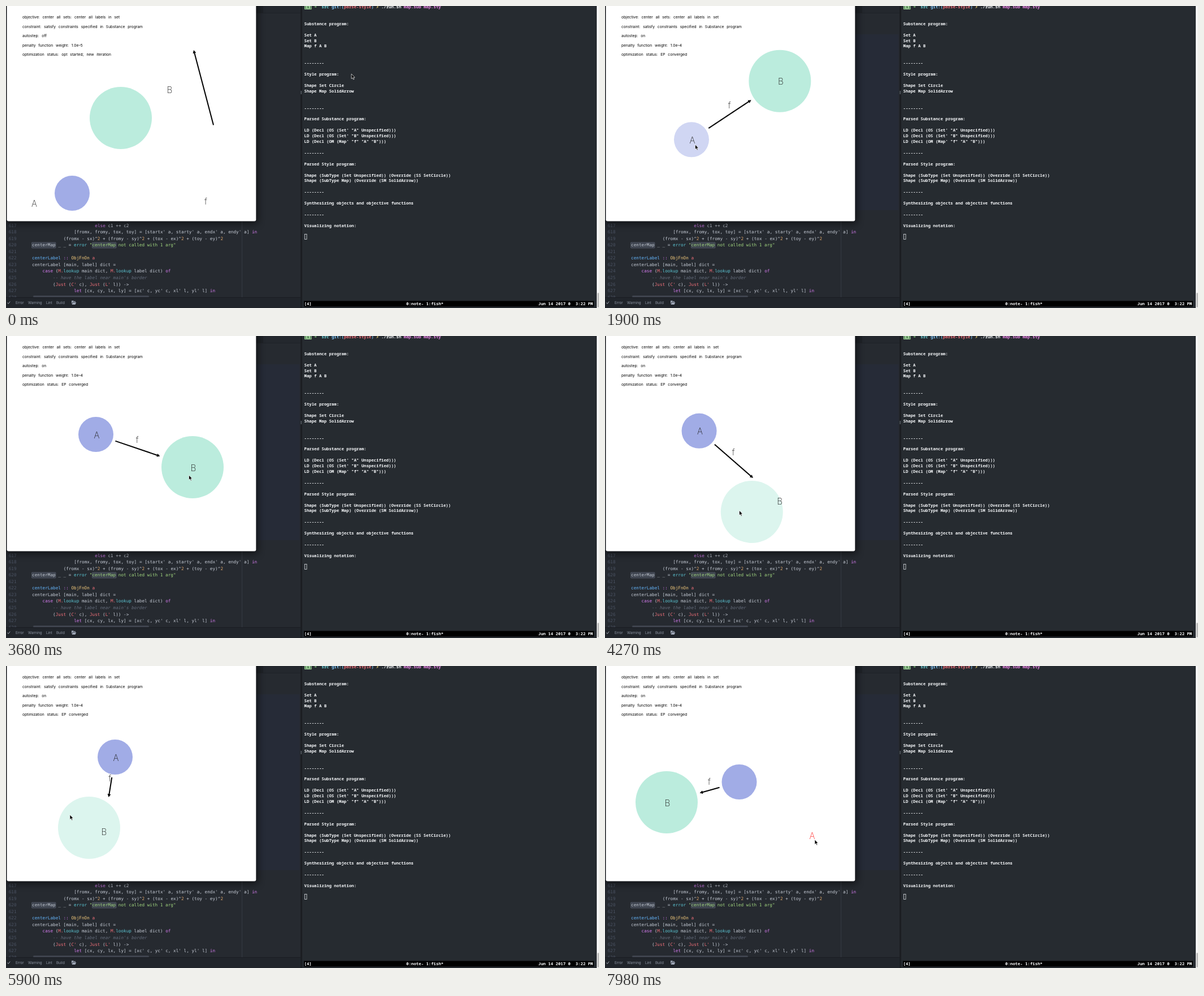
Write an HTML page that moves like this. It is 1049 by 534 pixels and loops after 8000 ms.

```html
<!DOCTYPE html>
<html lang="en">
<head>
<meta charset="utf-8">
<title>Set diagram session</title>
<style>
html, body { margin: 0; width: 100%; height: 100%; overflow: hidden; background: #262a30; }
svg { display: block; }
text { white-space: pre; }
.code { font: 7.7px "DejaVu Sans Mono", monospace; fill: #c6ccd6; }
.term { font: 600 7.333px "Noto Sans Mono", "DejaVu Sans Mono", monospace; fill: #f6f8fa; }
.info { font: 6.7px Inter, sans-serif; word-spacing: 2.9px; fill: #000; }
.bar { font: 6.3px Inter, sans-serif; fill: #8f97a5; }
.label { font: 200 15.2px Inter, Lato, sans-serif; text-anchor: middle; fill: #222; }
</style>
</head>
<body>
<svg id="stage" width="1049" height="534" viewBox="0 0 1049 534">
  <defs>
    <filter id="shadow" x="-20%" y="-20%" width="140%" height="140%">
      <feGaussianBlur stdDeviation="7"/>
    </filter>
    <clipPath id="page"><rect x="1.5" y="-8" width="440.8" height="388.5" rx="3"/></clipPath>
    <clipPath id="editor"><rect width="521" height="515"/></clipPath>
  </defs>
  <g id="back"></g>
  <g id="scene" clip-path="url(#page)"></g>
  <g id="top"></g>
</svg>
<script>
const NS = "http://www.w3.org/2000/svg";
const $ = id => document.getElementById(id);
const back = $("back"), scene = $("scene");

function add(parent, tag, attrs, content) {
  const el = document.createElementNS(NS, tag);
  set(el, attrs);
  if (content) el.textContent = content;
  parent.appendChild(el);
  return el;
}
function set(el, attrs) {
  for (const k in attrs) el.setAttribute(k, attrs[k]);
}
const rect = (x, y, width, height, fill, more) =>
  add(back, "rect", { x, y, width, height, fill, ...more });
const text = (parent, cls, x, y, str, more) =>
  add(parent, "text", { class: cls, x, y, ...more }, str);

// ---------- code editor ----------
const HUES = { k: "#d67cf0", b: "#66b8ff", y: "#f5cb7c", r: "#f2707a",
  g: "#a3d980", c: "#5cc6d4", o: "#e2a66a", m: "#656d7c" };

// Coloured runs are written as {key:words}
function codeLine(parent, col, y, src) {
  const el = text(parent, "code", 46 + col * 4.636, y, "");
  src.split(/(\{\w:[^}]*\})/).forEach(part => {
    const run = part.match(/^\{(\w):(.*)\}$/);
    if (!run) return add(el, "tspan", {}, part);
    const span = add(el, "tspan", { fill: HUES[run[1]] }, run[2]);
    if (run[1] === "m") span.setAttribute("font-style", "italic");
  });
}

const CODE = [
  [24, "{k:else} c1 ++ c2"],
  [16, "[fromx, fromy, tox, toy] = [startx' a, starty' a, endx' a, endy' a] {k:in}"],
  [12, "(fromx - sx)^{o:2} + (fromy - sy)^{o:2} + (tox - ex)^{o:2} + (toy - ey)^{o:2}"],
  [0, "centerMap _ _ = {c:error} {g:\"centerMap not called with 1 arg\"}"],
  [0, ""],
  [0, "{b:centerLabel} {k:::} {y:ObjFnOn} {r:a}"],
  [0, "centerLabel [main, label] dict ="],
  [4, "{k:case} ({r:M.}{c:lookup} main dict, {r:M.}{c:lookup} label dict) {k:of}"],
  [8, "{m:-- have the label near main's border}"],
  [8, "({r:Just} ({r:C'} c), {r:Just} ({r:L'} l)) ->"],
  [16, "{k:let} [cx, cy, lx, ly] = [xc' c, yc' c, xl' l, yl' l] {k:in}"],
  [0, ""]
];

function drawEditor() {
  rect(0, 0, 521, 534, "#262a30");
  rect(0, 0, 521, 13, "#1f2328");
  rect(455, 0, 66, 12, "#24282e");
  rect(417, 380, 1, 135, "#353a43");
  const box = { stroke: "#59606d", "stroke-width": .7, rx: 1 };
  rect(45.5, 418, 42.5, 10, "#3b414c", box);
  rect(152.5, 418, 42.5, 10, "#3b414c", box);
  const g = add(back, "g", { "clip-path": "url(#editor)" });
  CODE.forEach(([col, src], i) => {
    const y = 390.5 + i * 11.57;
    text(g, "code", 4.7, y, String(617 + i), { style: "fill:#4b5363" });
    codeLine(g, col, y, src);
  });
  rect(48, 512, 205, 3, "#3f444e", { rx: 1.5 });
  rect(0, 515, 521, 19, "#21252b");
  rect(0, 515, 521, .8, "#181b20");
  add(back, "path", { d: "M2.5 524.5l1.7 2 3-4", fill: "none", stroke: "#a5acb8" });
  [[17, "Error"], [39, "Warning"], [71, "Lint"], [89, "Build"]]
    .forEach(([x, s]) => text(back, "bar", x, 527.3, s));
  add(back, "path", { d: "M116 521h3l1 1h3v1.3h-5l-2 3.7zM118.3 524h6l-1.8 4h-6z", fill: "#9da5b4" });
}

// ---------- terminal ----------
const DASH = "--------";
const ROWS = [
  [0, "Substance program:"], [2, "Set A"], [3, "Set B"], [4, "Map f A B"], [7, DASH],
  [9, "Style program:"], [11, "Shape Set Circle"], [12, "Shape Map SolidArrow"], [15, DASH],
  [17, "Parsed Substance program:"],
  [19, "LD (Decl (OS (Set' \"A\" Unspecified)))"],
  [20, "LD (Decl (OS (Set' \"B\" Unspecified)))"],
  [21, "LD (Decl (OM (Map' \"f\" \"A\" \"B\")))"], [23, DASH],
  [25, "Parsed Style program:"],
  [27, "Shape (SubType (Set Unspecified)) (Override (SS SetCircle))"],
  [28, "Shape (SubType Map) (Override (SM SolidArrow))"], [30, DASH],
  [32, "Synthesizing objects and objective functions"], [34, DASH],
  [36, "Visualizing notation:"]
];
const PROMPT = [
  [4, "➜", "#8fe08a"], [7, "src", "#6fd6dc"], [11, "git:(", "#7fc4f5"],
  [16, "parse-style", "#f2707a"], [27, ")", "#7fc4f5"], [29, "✗", "#f0d070"],
  [31, "./run.sh", "#f6f8fa"], [40, "map.sub map.sty", "#ea86e6"]
];

function drawTerminal() {
  const colX = n => 527.5 + n * 4.4;
  rect(521, 0, 3, 534, "#1b1e22");
  rect(521.5, 150, 1.5, 6, "#5a6068");
  rect(524, 0, 521, 534, "#262b30");
  rect(1045, 0, 4, 534, "#f7f7f7");
  rect(1046, 507, 3, 26, "#bdbdbd", { rx: 1.5 });
  rect(528, -3, 12.5, 9, "#9fd39a");
  text(back, "term", 527.7, 4.2, "[1]", { style: "fill:#2a4a30" });
  PROMPT.forEach(([n, s, c]) => text(back, "term", colX(n), 4.2, s, { style: "fill:" + c }));
  ROWS.forEach(([n, s]) => text(back, "term", 527.5, 33.8 + n * 9.915, s));
  rect(528.3, 403.4, 3.7, 9, "none", { stroke: "#dfe3e7", "stroke-width": .8 });
  rect(527, 521.5, 513, 10, "#000");
  text(back, "term", 527.5, 529, "[4]");
  text(back, "term", 708, 529, "0:note- 1:fish*");
  text(back, "term", 941.5, 529, "Jun 14 2017 0  3:22 PM");
}

drawEditor();
const pane = rect(442, 50, 77.5, 311, "#262b37");
drawTerminal();

// ---------- diagram window ----------
rect(0, -10, 445, 394, "#000", { opacity: .6, filter: "url(#shadow)" });
rect(1.5, -8, 440.8, 388.5, "#fff", { rx: 3 });

const info = [20, 36.5, 53, 70, 86].map(y => text(scene, "info", 29, y + 2.4, ""));
const FIXED = ["objective: center all sets: center all labels in set",
  "constraint: satisfy constraints specified in Substance program"];
const BEFORE = [...FIXED, "autostep: off", "penalty function weight: 1.0e–5",
  "optimization status: opt started; new iteration"];
const AFTER = [...FIXED, "autostep: on", "penalty function weight: 1.0e–4",
  "optimization status: EP converged"];

const discB = add(scene, "circle", { r: 55 });
const discA = add(scene, "circle", { r: 31 });
const shaft = add(scene, "line", { stroke: "#000", "stroke-width": 2 });
const head = add(scene, "path", { d: "M0 0L-5.5 -2.9V2.9z" });
const [nameA, nameB, nameF] = ["A", "B", "f"].map(s => text(scene, "label", 0, 0, s));
const pointer = add($("top"), "path", {
  d: "M0 0V8.6L2 6.8 3.4 10 4.8 9.4 3.5 6.3H6z",
  fill: "#000", stroke: "#fff", "stroke-width": .7
});

// ---------- motion ----------
// Each row is [step, x, y]
const PATH = {
  a: [[-1,186,324],[4,186,324],[7,150,300],[11,154,215],[14,158,184],[16,158,184],
    [22,159,174],[31,176,160],[37,193,161],[39,200,165],[45,237.5,205]],
  b: [[9,308,146],[12,312,106],[15,319,176],[16,319,176],[17,340,168],[19,370,190],
    [22,330,232],[23,319,266],[27,240,326],[31,180,312],[37,147,286],[39,127,273],[44,109,241]],
  lag: [[22,0,0],[27,60,-25],[31,68,-16],[37,25,6],[44,0,0]],
  drop: [[47,0,0],[51,127.5,94.5]],
  mouse: [[-1,598,112],[4,229,289],[7,158,305],[11,160,225],[13,325,120],[16,336.5,163],
    [17,350,160],[19,378,185],[22,323.5,246],[23,305,268],[27,215,322],[31,140,311],
    [37,113,263],[40,95,250],[43,324,235],[47,243,212],[51,371,307]]
};
const inside = (s, spans) => spans.some(([from, to]) => s >= from && s <= to);
const HELD_A = [[5, 10]], HELD_B = [[12, 14], [18, 20], [23, 39]];

function at(rows, s) {
  const i = rows.findIndex(r => r[0] >= s);
  if (i < 0) return rows[rows.length - 1].slice(1);
  if (i === 0) return rows[0].slice(1);
  const p = rows[i - 1], q = rows[i], k = (s - p[0]) / (q[0] - p[0]);
  return [p[1] + (q[1] - p[1]) * k, p[2] + (q[2] - p[2]) * k];
}
const plus = (p, x, y) => [p[0] + x, p[1] + y];

function pose(t) {
  if (t < 150) return {
    lines: BEFORE, a: [117, 331], b: [203, 198], la: [50, 349], lb: [289.5, 148],
    lf: [353.5, 345], from: [367, 210.5], to: [332, 78], mouse: [611, 120], pane: false
  };
  const s = Math.max(-1, Math.min(51, Math.floor((t - 406) / 148.4)));
  const a = at(PATH.a, s), b = at(PATH.b, s);
  const aim = plus(b, ...at(PATH.lag, s));
  const dx = aim[0] - a[0], dy = aim[1] - a[1], d = Math.hypot(dx, dy);
  const from = plus(a, dx / d * 36.3, dy / d * 36.3);
  const to = plus(aim, -dx / d * 60.8, -dy / d * 60.8);
  return {
    lines: AFTER, a, b, from, to, pane: true,
    la: plus(plus(a, 1.5, 1), ...at(PATH.drop, s)),
    lb: plus(aim, 1.5, 1),
    lf: [(from[0] + to[0]) / 2 - .7, (from[1] + to[1]) / 2 - 15.5],
    mouse: at(PATH.mouse, s),
    heldA: inside(s, HELD_A), heldB: inside(s, HELD_B), red: s >= 48
  };
}

const place = (el, [x, y]) => set(el, { x, y: y + 5.5 });

function draw(t) {
  const p = pose(t);
  info.forEach((el, i) => { if (el.textContent !== p.lines[i]) el.textContent = p.lines[i]; });
  set(pane, { visibility: p.pane ? "visible" : "hidden" });
  set(discA, { cx: p.a[0], cy: p.a[1], fill: p.heldA ? "#d0d6f3" : "#a1ace6" });
  set(discB, { cx: p.b[0], cy: p.b[1], fill: p.heldB ? "#dcf5ee" : "#bbecdd" });
  const turn = Math.atan2(p.to[1] - p.from[1], p.to[0] - p.from[0]);
  set(shaft, { x1: p.from[0], y1: p.from[1],
    x2: p.to[0] - 4 * Math.cos(turn), y2: p.to[1] - 4 * Math.sin(turn) });
  set(head, { transform: `translate(${p.to}) rotate(${turn * 180 / Math.PI})` });
  place(nameA, p.la);
  place(nameB, p.lb);
  place(nameF, p.lf);
  nameA.style.fill = p.red ? "#f22" : "";
  set(pointer, { transform: `translate(${p.mouse})` });
}

const start = performance.now();
function tick() {
  draw((performance.now() - start) % 8000);
  requestAnimationFrame(tick);
}
tick();
</script>
</body>
</html>
```
